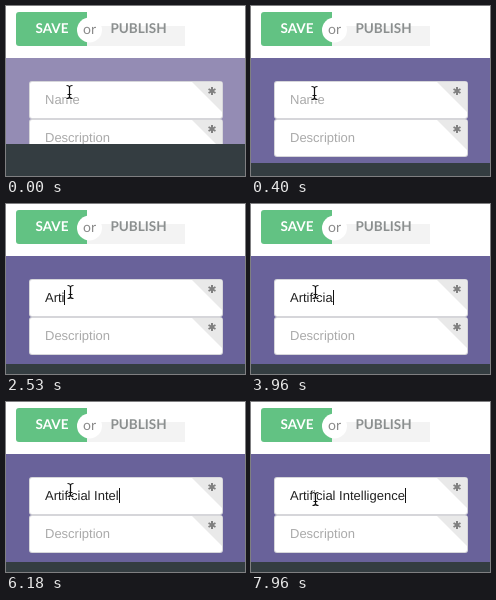
An HTML page with a canvas that plays this animation: 239 px wide and 170 px high, repeating every 8000 ms.

```html
<!DOCTYPE html>
<html lang="en">
<head>
<meta charset="utf-8">
<title>Form typing</title>
<style>
html, body { margin: 0; width: 100%; height: 100%; overflow: hidden; background: #fff; }
canvas { display: block; }
</style>
</head>
<body>
<canvas id="stage" width="239" height="170"></canvas>
<script>
const ctx = document.getElementById('stage').getContext('2d');
const LOOP = 8000;
const PHRASE = 'Artificial Intelligence';
const FOCUS_AT = 1350;
const KEY_TIMES = [
  1580, 2060, 2290, 2530, 2950, 3150, 3340, 3540, 3960, 4320, 4500,
  4920, 5160, 5520, 5760, 6180, 6360, 6720, 7010, 7200, 7380, 7560, 7740
];
const FIELD_FONT = '13px "Liberation Sans", Arial, sans-serif';
const BUTTON_FONT = 'bold 13.5px Lato, sans-serif';

function rect(x, y, w, h, color) {
  ctx.fillStyle = color;
  ctx.fillRect(x, y, w, h);
}

function rounded(x, y, w, h, r, color) {
  ctx.fillStyle = color;
  ctx.beginPath();
  ctx.roundRect(x, y, w, h, r);
  ctx.fill();
}

function label(text, x, y, font, color, align = 'left') {
  ctx.font = font;
  ctx.textAlign = align;
  ctx.fillStyle = color;
  ctx.fillText(text, x, y);
}

function mix(a, b, p) {
  return `rgb(${a.map((v, i) => Math.round(v + (b[i] - v) * p)).join(',')})`;
}

function drawHeader() {
  rect(0, 0, 239, 52, '#fff');
  rounded(10, 6, 71, 34, [3, 0, 0, 3], '#62c283');
  rect(81, 20, 98, 20, '#f3f3f3');
  ctx.fillStyle = '#fff';
  ctx.beginPath();
  ctx.arc(83.5, 24, 12.5, 0, Math.PI * 2);
  ctx.fill();
  label('SAVE', 46, 27, BUTTON_FONT, '#fff', 'center');
  label('or', 83.5, 28, '14px Lato, sans-serif', '#8b8b8b', 'center');
  label('PUBLISH', 132.5, 27, BUTTON_FONT, '#8b8f8f', 'center');
}

function drawAsterisk(x, y) {
  ctx.strokeStyle = '#808080';
  ctx.lineWidth = 2;
  ctx.beginPath();
  for (let i = 0; i < 3; i++) {
    const a = Math.PI / 2 + i * Math.PI / 3;
    const dx = Math.cos(a) * 4, dy = Math.sin(a) * 4;
    ctx.moveTo(x - dx, y - dy);
    ctx.lineTo(x + dx, y + dy);
  }
  ctx.stroke();
}

function drawField(y) {
  rounded(23, y, 194, 38, 3, '#d6d6da');
  rounded(24, y + 1, 192, 36, 2, '#fff');
  ctx.fillStyle = '#e9e9e9';
  ctx.beginPath();
  ctx.moveTo(186, y + 1);
  ctx.lineTo(216, y + 1);
  ctx.lineTo(216, y + 31);
  ctx.fill();
  drawAsterisk(206, y + 10);
}

function drawTyping(t) {
  const count = KEY_TIMES.filter(k => k <= t).length;
  const typed = PHRASE.slice(0, count);
  if (count) label(typed, 39, 98, FIELD_FONT, '#222');
  else label('Name', 39, 98, FIELD_FONT, '#aaa');
  if (t < FOCUS_AT) return;
  ctx.font = FIELD_FONT;
  const end = 39 + ctx.measureText(typed).width;
  rect(count > 4 ? Math.ceil(end) : Math.floor(end), 86, 1, 15, '#111');
}

function drawPointer(x, y) {
  const trace = (color, width) => {
    ctx.strokeStyle = color;
    ctx.lineWidth = width;
    ctx.beginPath();
    ctx.moveTo(x - 3, y - 6.5);
    ctx.quadraticCurveTo(x, y - 6.5, x, y - 4.5);
    ctx.quadraticCurveTo(x, y - 6.5, x + 3, y - 6.5);
    ctx.moveTo(x, y - 5);
    ctx.lineTo(x, y + 5);
    ctx.moveTo(x - 3, y + 6.5);
    ctx.quadraticCurveTo(x, y + 6.5, x, y + 4.5);
    ctx.quadraticCurveTo(x, y + 6.5, x + 3, y + 6.5);
    ctx.moveTo(x - 2, y + 2.5);
    ctx.lineTo(x + 2, y + 2.5);
    ctx.stroke();
  };
  trace('rgba(255,255,255,.85)', 3);
  trace('#111', 1.2);
}

function pointerAt(t) {
  if (t < 120) return [63.5, 86];
  if (t < 600) return [63.5, 87];
  if (t < 7860) return [64.5, 88];
  return t < 7950 ? [64.5, 92] : [64.5, 97];
}

function draw(t) {
  const reveal = 1 - Math.pow(1 - Math.min(t / 700, 1), 2.5);
  ctx.textRendering = 'geometricPrecision';
  drawHeader();
  rect(0, 52, 239, 118, mix([148, 140, 180], [105, 98, 154], reveal));
  drawField(75);
  drawField(113);
  label('Description', 39, 136, FIELD_FONT, '#aaa');
  drawTyping(t);
  const barTop = Math.round(138 + 22 * reveal);
  rect(0, barTop, 239, 170 - barTop, '#343d41');
  drawPointer(...pointerAt(t));
}

const start = performance.now();
function tick() {
  draw((performance.now() - start) % LOOP);
  requestAnimationFrame(tick);
}
tick();
</script>
</body>
</html>
```
